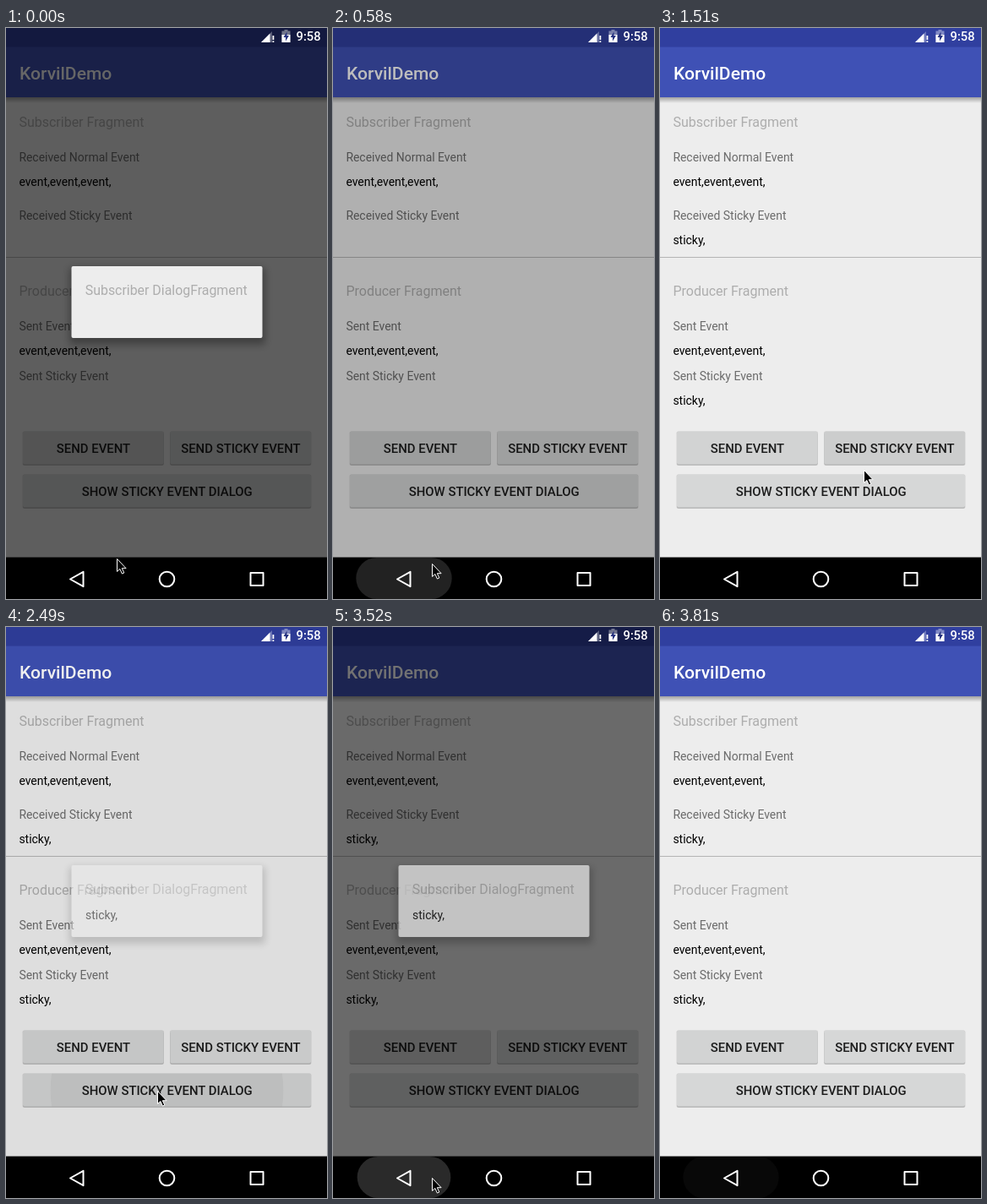
An HTML page that plays this animation: 380x676 px, repeating every 4140 ms.

```html
<!DOCTYPE html>
<html lang="en">
<head>
<meta charset="utf-8">
<title>Event demo</title>
<style>
html, body { margin: 0; width: 100%; height: 100%; overflow: hidden; background: #000; }
svg { display: block; width: 100%; height: 100%; }
text { font-family: Roboto, sans-serif; font-size: 13.95px; }
.head { font-size: 16px; fill: #000; fill-opacity: .27; }
.label { fill: #000; fill-opacity: .55; }
.btn { font-size: 14.9px; font-weight: 500; text-anchor: middle; fill: #000; fill-opacity: .87; }
.bar { fill: #fff; font-weight: 500; }
.icon { fill: none; stroke: #fff; stroke-width: 2; stroke-linejoin: round; }
</style>
</head>
<body>
<svg viewBox="0 0 380 676">
  <defs>
    <linearGradient id="fade" x2="0" y2="1">
      <stop stop-color="#000" stop-opacity=".32"/>
      <stop offset="1" stop-color="#000" stop-opacity="0"/>
    </linearGradient>
    <filter id="blur" x="-20%" y="-40%" width="140%" height="180%"><feGaussianBlur stdDeviation="4"/></filter>
  </defs>

  <rect width="380" height="627" fill="#ededed"/>
  <rect y="82" width="380" height="7" fill="url(#fade)"/>
  <rect width="380" height="23" fill="#303f9f"/>
  <rect y="22.5" width="380" height="59.5" fill="#3f51b5"/>
  <text class="bar" x="16" y="61" style="font-size:21.1px">KorvilDemo</text>
  <rect y="271" width="380" height="1" fill="#b4b4b4"/>
  <g id="page"></g>
  <rect id="dim" width="380" height="627"/>

  <g id="dialog">
    <rect x="75" y="284" width="232" height="91" rx="4" opacity=".3" filter="url(#blur)"/>
    <rect x="77.5" y="282" width="226" height="85" rx="2" fill="#ededed"/>
    <text class="head" x="93.8" y="316" style="font-size:15.9px">Subscriber DialogFragment</text>
    <text id="note" x="94" y="346">sticky,</text>
  </g>

  <g fill="#fff">
    <path d="M302 17 315 4V17Z" opacity=".3"/>
    <path d="M302 17 312.5 6.5V17Z"/>
    <path d="M315.5 9h1.8v5h-1.8zM315.5 15.2h1.8v1.8h-1.8z"/>
    <path d="M329.5 2h4v1.5h3V17h-10V3.5h3z" opacity=".4"/>
    <path d="M326.5 8h10v9h-10z"/>
    <path d="M332.5 4.5 328.5 11H331v4.5L335 9h-2.5z" fill="#263280"/>
  </g>
  <text class="bar" x="343.5" y="15" style="font-size:14.8px">9:58</text>

  <rect y="626.6" width="380" height="49.4"/>
  <rect id="glow" y="627" height="49" rx="24.5" fill="#fff"/>
  <g class="icon">
    <path d="M91.5 643.8V661.2L76 652.5Z"/>
    <circle cx="190.5" cy="652.5" r="8.8"/>
    <rect x="289.5" y="645" width="15" height="15"/>
  </g>

  <path id="cursor" d="M0 0V15L3.4 12 5.9 17.6 8.3 16.5 5.8 11.2H10.6Z" stroke="#fff" stroke-width="1"/>
</svg>

<script>
// Times below count screen updates of STEP ms
const LOOP = 4140, STEP = 57.6, LAST = 66;
const $ = id => document.getElementById(id);

function set(el, attrs) {
  for (const name in attrs) el.setAttribute(name, attrs[name]);
}

function add(parent, tag, attrs, content = '') {
  const el = document.createElementNS('http://www.w3.org/2000/svg', tag);
  set(el, attrs);
  el.textContent = content;
  parent.append(el);
  return el;
}

const clamp = u => Math.min(1, Math.max(0, u));
const ease = (k, from, length) => .5 - .5 * Math.cos(Math.PI * clamp((k - from) / length));
const fadeOut = (k, release) => 1 - clamp((k - release) / 6.6) ** 2;

// A fragment has two captions, each with a log line below
function fragment(y, title, first, second, gap) {
  const line = (cls, dy, s) => add($('page'), 'text', { class: cls, x: 15.4, y: y + dy }, s);
  line('head', 0, title);
  line('label', 41, first);
  line('value', 70, 'event,event,event,');
  line('label', 100 + gap, second);
  return line('value', 129 + gap, 'sticky,');
}

// Returns a function that draws the touch ripple
function button(x, y, width, caption, id) {
  const page = $('page'), box = { x, y, width, height: 39, rx: 2 };
  add(page, 'rect', { ...box, x: x - .5, width: width + 1, height: 40.4, opacity: .12 });
  add(page, 'rect', { ...box, y: y + 1.2, opacity: .14 });
  add(page, 'rect', { ...box, fill: '#d6d7d7' });
  add(add(page, 'clipPath', { id }), 'rect', box);
  const touch = add(page, 'g', { 'clip-path': `url(#${id})` });
  add(touch, 'rect', { ...box, opacity: .02 });
  const wave = add(touch, 'circle', { cx: x + width / 2, cy: y + 20, opacity: .04 });
  add(page, 'text', { class: 'btn', x: x + width / 2 + .2, y: y + 25 }, caption);
  return (k, press, release) => {
    set(touch, { opacity: k < press ? 0 : fadeOut(k, release) });
    set(wave, { r: 46 * Math.max(0, k - press) });
  };
}

const logs = [
  fragment(117, 'Subscriber Fragment', 'Received Normal Event', 'Received Sticky Event', 10),
  fragment(317, 'Producer Fragment', 'Sent Event', 'Sent Sticky Event', 0)
];
button(20, 477.5, 166.5, 'SEND EVENT', 'send');
const touchSticky = button(194.5, 477.5, 166.5, 'SEND STICKY EVENT', 'sticky');
const touchShow = button(20, 528.5, 341, 'SHOW STICKY EVENT DIALOG', 'show');

// Pointer glides: start, length, x, y
const glides = [
  [0, 3, 117, 634], [11, 8, 264, 499], [24, 2, 241, 523],
  [26, 9, 179, 549], [46, 8, 64, 657], [54, 5, 117, 652]
];

function drawBack(k) {
  const [press, release] = k < 30 ? [4, 7] : [59.3, 60];
  const grow = 1 - 400 ** (-1.4 * clamp((k - press) / 6));
  const width = 84 * (1 + .35 * grow);
  set($('glow'), { x: 84 - width / 2, width, opacity: k < press ? 0 : .17 * fadeOut(k, release) });
}

function draw(time) {
  const k = Math.min(LAST, Math.floor((time % LOOP) / STEP));
  // Open at first, closed, opened again, closed
  const open = (show, hide) => 1 - ease(k, 7, hide) + ease(k, 42.5, show) - ease(k, 60, hide);
  set($('dim'), { opacity: .6 * open(2.4, 5.5) });
  set($('dialog'), { opacity: open(1, 2.6) });
  set($('note'), { opacity: +(k > 40) });
  logs.forEach(el => set(el, { opacity: +(k >= 23) }));

  touchSticky(k, 20, 23);
  touchShow(k, 40, 42.5);
  drawBack(k);

  const [x, y] = glides.reduce(([px, py], [from, length, gx, gy]) => {
    const u = ease(k, from, length);
    return [px + (gx - px) * u, py + (gy - py) * u];
  }, [131, 628]);
  set($('cursor'), { transform: `translate(${x + .5} ${y + .5})`, opacity: +(k < LAST) });
}

const start = performance.now();
function tick() {
  draw(performance.now() - start);
  requestAnimationFrame(tick);
}
tick();
</script>
</body>
</html>
```
